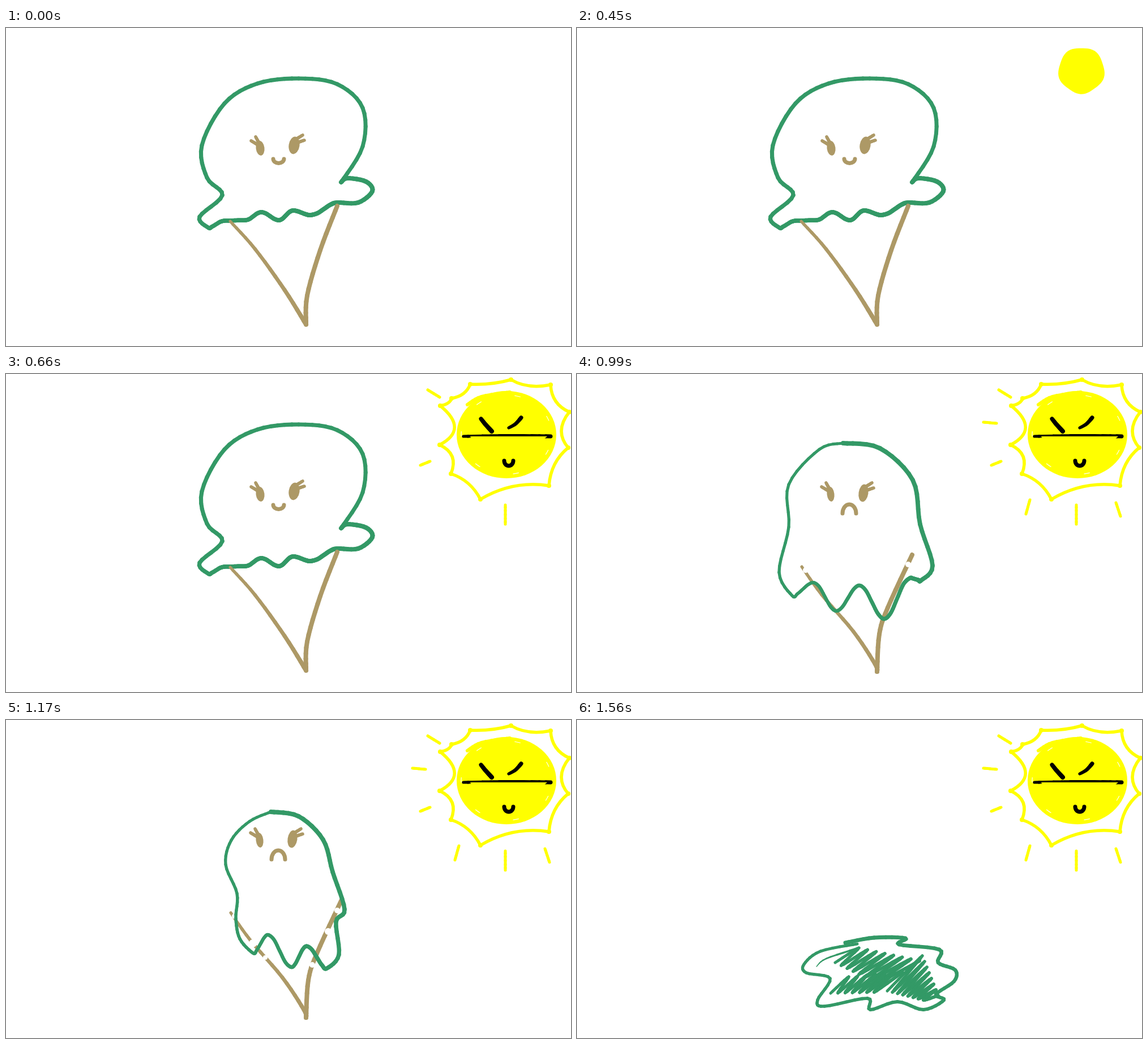
Write an HTML page with a canvas that moves like this. It is 998 px wide and 561 px high and loops after 1.77 s.

```html
<!DOCTYPE html>
<html lang="en">
<head>
<meta charset="utf-8">
<title>Melting ice cream</title>
<style>
html, body { margin: 0; width: 100%; height: 100%; overflow: hidden; background: #fff; }
canvas { display: block; }
</style>
</head>
<body>
<canvas id="stage" width="998" height="561"></canvas>
<script>
const ctx = document.getElementById('stage').getContext('2d');
const GREEN = '#339966', TAN = '#ad9966', YELLOW = '#ffff00', BLACK = '#000', WHITE = '#fff';
const LOOP = 1770, STEPS = 6, TAU = Math.PI * 2;
const mix = (a, b, t) => a + (b - a) * t;

function spline(a, b, c, d, t) {
  return 0.5 * (2 * b + (c - a) * t + (2 * a - 5 * b + 4 * c - d) * t * t + (3 * b - a - 3 * c + d) * t * t * t);
}

// Smooth line through flat x,y pairs
function curve(p) {
  const n = p.length / 2, out = [];
  const at = (i, k) => p[2 * Math.max(0, Math.min(n - 1, i)) + k];
  for (let i = 0; i < n - 1; i++) {
    for (let s = 0; s < STEPS; s++) {
      out.push([0, 1].map(k => spline(at(i - 1, k), at(i, k), at(i + 1, k), at(i + 2, k), s / STEPS)));
    }
  }
  out.push([at(n - 1, 0), at(n - 1, 1)]);
  return out;
}

// Round brush whose width runs from w0 to w1
function brush(color, w0, w1, p) {
  const c = curve(p);
  ctx.strokeStyle = color;
  ctx.lineCap = ctx.lineJoin = 'round';
  for (let i = 1; i < c.length; i++) {
    ctx.lineWidth = mix(w0, w1, i / (c.length - 1));
    ctx.beginPath();
    ctx.moveTo(...c[i - 1]);
    ctx.lineTo(...c[i]);
    ctx.stroke();
  }
}

function oval(color, x, y, rx, ry = rx, turn = 0) {
  ctx.fillStyle = color;
  ctx.beginPath();
  ctx.ellipse(x, y, rx, ry, turn, 0, TAU);
  ctx.fill();
}

function arc(color, width, x, y, rx, ry, from, to) {
  ctx.strokeStyle = color;
  ctx.lineWidth = width;
  ctx.lineCap = 'round';
  ctx.beginPath();
  ctx.ellipse(x, y, rx, ry, 0, from, to);
  ctx.stroke();
}

// Cosine wave through its alternating low and high points
function wave(p) {
  const out = [];
  for (let i = 0; i + 3 < p.length; i += 2) {
    for (let t = 0; t < 1; t += 0.25) {
      out.push(mix(p[i], p[i + 2], t), mix(p[i + 1], p[i + 3], (1 - Math.cos(Math.PI * t)) / 2));
    }
  }
  return out.concat(p.slice(-2));
}

// Closed outline: right side, dripping hem, left side back to the start
function cream(thin, right, drips, left) {
  brush(GREEN, 8, thin, [...right, ...wave(drips), ...left, ...right.slice(0, 2)]);
}

function cone(left, right, tip) {
  brush(TAN, 5, 8, [...left, 530, tip]);
  brush(TAN, 8, 8, [...right, 530, tip]);
}

function face(lx, ly, rx, ry, size) {
  oval(TAN, lx, ly, size - 1, 13, -0.12);
  oval(TAN, rx, ry, size + 1, 15.5, 0.15);
  const lash = (x, y, dx, dy) => brush(TAN, 6, 5.5, [x, y, x + dx, y + dy]);
  lash(lx - 2, ly - 9, -6, -11);
  lash(lx - 4, ly - 6, -12, -7);
  lash(rx + 2, ry - 10, 13, -8);
  lash(rx + 6, ry - 5, 12, -4);
}

function sadFace() {
  face(448, 212, 506, 210, 7.5);
  arc(TAN, 7, 481, 246, 12, 16, Math.PI, TAU);
}

function meltingCone(rubbed) {
  cone([397,340, 432,389, 488,454, 526,511], [592,319, 549,412, 534,459], 525);
  const rubs = [[404,346,5], [585,336,5], [436,394,7], [458,419,4], [569,373,6], [541,432,5]];
  rubs.slice(0, rubbed).forEach(r => oval(WHITE, ...r));
}

function happy() {
  cream(7, [592,272, 603,265, 636,271, 647,288, 622,308], [586,308, 538,330, 507,322, 482,339, 451,325, 423,339, 386,340, 357,352],
    [342,333, 382,295, 355,264, 346,207, 386,133, 444,98, 517,89, 585,99, 630,141, 630,209]);
  cone([396,341, 440,390, 492,462], [585,314, 555,392, 532,472], 523);
  face(449, 212, 509, 207, 8.5);
  arc(TAN, 7, 481.5, 231, 9.5, 7.5, 0, Math.PI);
}

function softened() {
  meltingCone(0);
  cream(5, [463,94, 513,83, 587,126, 616,200, 601,264, 625,310], [598,346, 567,323, 536,360, 495,312, 449,359, 407,316, 371,350],
    [353,328, 370,262, 355,214, 371,157, 425,110]);
  sadFace();
}

function dripping() {
  meltingCone(2);
  cream(5, [470,122, 535,131, 593,187, 606,265, 628,338], [608,364, 588,360, 543,432, 499,373, 458,418, 418,368, 380,391],
    [357,350, 374,270, 374,195, 428,133]);
  sadFace();
}

function sagging() {
  meltingCone(6);
  cream(5, [468,162, 517,170, 560,211, 577,268, 598,334, 583,356, 588,414], [567,438, 531,399, 504,436, 463,379, 436,411],
    [413,386, 406,350, 408,306, 388,255, 398,212, 430,179]);
  sadFace();
}

function collapsed() {
  meltingCone(6);
  cream(5, [482,262, 517,269, 547,302, 574,362, 580,378, 618,406, 597,433, 596,446], [565,463, 539,450, 502,473, 470,430, 434,451],
    [420,416, 407,340, 438,284]);
}

// Back-and-forth scribble between a low edge and a high edge
function scribble(low, high, turns) {
  const p = [];
  for (let i = 0; i <= turns; i++) {
    for (const edge of [low, high]) {
      p.push(mix(edge[0], edge[2], i / turns), mix(edge[1], edge[3], i / turns));
    }
  }
  brush(GREEN, 5, 6, p);
}

function puddle() {
  brush(GREEN, 7, 5, [474,393, 525,384, 580,385, 569,396, 640,405, 638,428, 668,441, 666,461, 634,484, 648,494, 612,511,
    566,497, 518,511, 513,491, 437,505, 425,494, 447,456, 405,446, 401,431, 430,408, 495,395]);
  brush(GREEN, 1, 4, [423,435, 440,421, 498,402]);
  scribble([456,428, 530,464], [498,402, 605,425], 7);
  scribble([448,482, 525,480], [480,453, 575,445], 6);
  scribble([548,478, 612,494], [610,416, 638,486], 7);
}

function sunDrop(x, y, r) {
  ctx.fillStyle = YELLOW;
  ctx.beginPath();
  for (let a = 0; a < TAU; a += 0.1) {
    const d = r * (1 + 0.03 * Math.sin(5 * a));
    ctx.lineTo(x + d * Math.cos(a), y + d * Math.sin(a));
  }
  ctx.fill();
}

function sunFace() {
  brush(BLACK, 7, 8, [839,79, 847,89, 858,101]);
  brush(BLACK, 5, 7, [888,95, 900,88, 910,77]);
  brush(BLACK, 5, 7, [808,110, 885,109, 962,110]);
  ctx.fill(new Path2D('M820 110L836 145L874 142L878 125L888 116L897 125L903 139L935 138L942 121L956 110Z'));
  arc(BLACK, 7, 888, 153, 8, 9, 0, Math.PI);
}

// Rim of points joined by arcs that sag towards the middle
function sunRim(x, y) {
  const tips = [[820,18,3], [892,10,7], [962,19,9], [995,67,13], [993,130,8], [959,197,11], [838,221,7],
    [786,176,13], [766,125,26], [767,56,4], [787,43,6]];
  tips.forEach(([x0, y0, sag], i) => {
    const [x1, y1] = tips[(i + 1) % tips.length];
    const mx = (x0 + x1) / 2, my = (y0 + y1) / 2, pull = 2 * sag / Math.hypot(x - mx, y - my);
    ctx.strokeStyle = YELLOW;
    ctx.lineWidth = 5.5;
    ctx.beginPath();
    ctx.moveTo(x0, y0);
    ctx.quadraticCurveTo(mix(mx, x, pull), mix(my, y, pull), x1, y1);
    ctx.stroke();
    oval(YELLOW, x0, y0, 4);
  });
}

function bigSun(rayCount = 3) {
  const x = 884, y = 107;
  oval(YELLOW, x, y, 88, 77);
  brush(YELLOW, 6, 6, [815,54, 840,40, 890,32]);
  for (let a = 0.4; a < TAU; a += 0.9) arc(WHITE, 1.2, x, y, 80, 70, a, a + 0.12);
  sunRim(x, y);
  const rays = [[745,28, 766,41], [732,161, 749,154], [882,231, 882,265],
    [718,85, 741,87], [800,222, 793,247], [952,227, 960,251]];
  rays.slice(0, rayCount).forEach(r => brush(YELLOW, 5, 5, r));
  sunFace();
}

const blazing = () => bigSun(6);

const scenes = [
  [0, happy],
  [90, happy, () => sunDrop(897.5, 74.5, 11)],
  [330, happy, () => sunDrop(893, 74, 25)],
  [450, happy, () => sunDrop(891, 75, 40.5)],
  [660, happy, () => bigSun()],
  [870, softened, blazing],
  [990, dripping, blazing],
  [1170, sagging, blazing],
  [1350, collapsed, blazing],
  [1560, puddle, blazing]
];

let shown = null;
const start = performance.now();

function draw(now) {
  const t = Math.max(0, now - start) % LOOP;
  const scene = scenes.filter(s => s[0] <= t).pop();
  if (scene !== shown) {
    shown = scene;
    ctx.fillStyle = WHITE;
    ctx.fillRect(0, 0, 998, 561);
    scene.slice(1).forEach(paint => paint());
  }
  requestAnimationFrame(draw);
}
draw(start);
</script>
</body>
</html>
```
